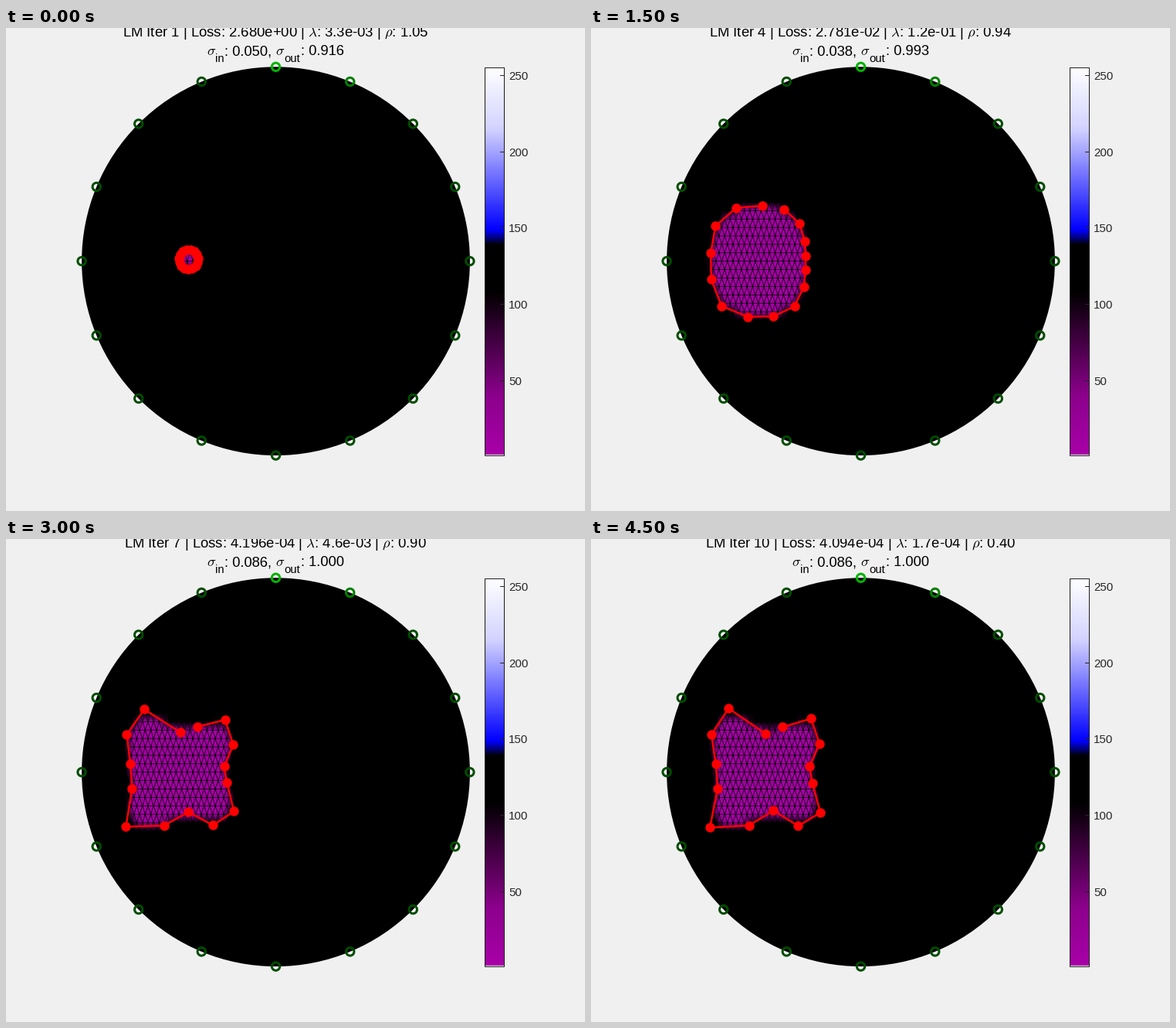
These frames come from a looping animation (750 px wide and 625 px high, 5000 ms). A matplotlib script:

```python
import numpy as np
import matplotlib.pyplot as plt
from matplotlib.animation import FuncAnimation
from matplotlib.collections import EllipseCollection
from matplotlib.colors import LinearSegmentedColormap
from matplotlib.path import Path
from matplotlib.tri import Triangulation

W, H, DPI = 750, 625, 100
PX = 72 / DPI                      # points per pixel
CX, CY, R = 349.5, 301.7, 251.4    # tank
SX, SY = 236.4, 299.3              # centre of the inclusion
DARK = "#262626"

plt.rcParams["font.family"] = "Liberation Sans"
plt.rcParams["mathtext.fontset"] = "cm"

# Control points slide along 15 fixed rays around the inclusion's centre
RAYS = np.radians(102 + 24 * np.arange(15))
UX, UY = np.cos(RAYS), -np.sin(RAYS)
PINCUSHION = np.array([48, 99, 93, 75, 76, 111, 78, 52, 79, 82, 53, 47, 69, 83, 57])

# Readouts per iteration; the sigmas stay at their last value
LOSS = [2.680, 2.478, 2.598e-1, 2.781e-2, 2.364e-3,
        5.285e-4, 4.196e-4, 4.113e-4, 4.098e-4, 4.094e-4]
RHO = [1.05, 1.50, 2.11, 0.94, 0.97, 0.96, 0.90, 0.81, 0.62, 0.40]
SIGMA_IN = [0.050, 0.034, 0.010, 0.038, 0.079, 0.087, 0.086]
SIGMA_OUT = [0.916, 0.921, 0.930, 0.993, 1.000]


def at(values, i):
    return values[min(i, len(values) - 1)]


def damping(i):
    return 3.3e-3 if i == 0 else 1.11 / 3 ** (i - 1)


def mix(a, b, t):
    return a + (b - a) * t


def superellipse(x, y, a, b, n):
    """Distance along each ray from the centre to a superellipse."""
    lo, hi = np.zeros(15), np.full(15, 150.0)
    for _ in range(30):
        r = (lo + hi) / 2
        within = (np.abs((SX + r * UX - x) / a) ** n
                  + np.abs((SY + r * UY - y) / b) ** n) < 1
        lo, hi = np.where(within, r, lo), np.where(within, hi, r)
    return lo


OVAL = superellipse(217.3, 300.8, 50, 70, 2.2)
ROUND = superellipse(216.5, 302, 61.5, 72, 2.9)


def radii(i):
    if i < 3:
        return mix(12.3, OVAL, (0, 0.2, 1)[i])
    return mix(ROUND, PINCUSHION, 1 - 0.45 ** (i - 3))


def control_points(i):
    r = radii(i)
    return np.column_stack([SX + r * UX, SY + r * UY])


def spline(p, steps=14):
    """Closed uniform cubic B-spline."""
    t = np.linspace(0, 1, steps, endpoint=False)[:, None, None]
    a, c, d = (np.roll(p, s, axis=0) for s in (1, -1, -2))
    q = ((1 - t) ** 3 * a + (3 * t**3 - 6 * t**2 + 4) * p
         + (-3 * t**3 + 3 * t**2 + 3 * t + 1) * c + t**3 * d) / 6
    return q.transpose(1, 0, 2).reshape(-1, 2)


def inside_weight(nodes, curve):
    gap = np.hypot(*(nodes[:, None] - curve[None]).transpose(2, 0, 1)).min(axis=1)
    sign = np.where(Path(curve).contains_points(nodes), 1, -1)
    return np.clip(0.5 + sign * gap / 6, 0, 1)


def mesh_nodes(side=7.27, rise=10.89):
    row, col = np.mgrid[-9:10, 0:25]
    x = 136.7 + side * (col + 0.5 * (row % 2 == 0))
    return np.column_stack([x.ravel(), (CY + rise * row).ravel()])


fig = plt.figure(figsize=(W / DPI, H / DPI), dpi=DPI, facecolor="#f0f0f0")
ax = fig.add_axes([0, 0, 1, 1])
ax.axis("off")

ax.add_patch(plt.Circle((CX, CY), R, fc="black", ec="none"))

nodes = mesh_nodes()
tri = Triangulation(nodes[:, 0], nodes[:, 1])
fill_map = LinearSegmentedColormap.from_list("fill", ["#000000", "#a600a6"])
fill = ax.tripcolor(tri, np.zeros(len(nodes)), shading="gouraud",
                    cmap=fill_map, vmin=0, vmax=1, zorder=2)
ax.triplot(tri, color="black", lw=0.8 * PX, zorder=3)

# Electrodes, clockwise from the top
turn = np.radians(22.5 * np.arange(16))
rings = np.column_stack([CX + R * np.sin(turn), CY - R * np.cos(turn)])
greens = [(0, 0.7, 0), (0, 0.5, 0)] + [(0, 0.3, 0)] * 14
ax.add_collection(EllipseCollection(
    [10.4] * 16, [10.4] * 16, [0] * 16, units="xy", offsets=rings,
    transOffset=ax.transData, facecolors="none", edgecolors=greens,
    linewidths=3 * PX, zorder=4))

# Colour bar
BX0, BX1, BY0, BY1 = 619.5, 644.5, 50.5, 552.5
stops = [(0, "#a800a8"), (0.15, "#8c008c"), (0.42, "#000000"), (0.54, "#000000"),
         (0.58, "#0000ff"), (0.84, "#d2d2ff"), (1, "#ffffff")]
bar_map = LinearSegmentedColormap.from_list("bar", stops)
ax.imshow(np.linspace(1, 0, 256)[:, None], cmap=bar_map, aspect="auto",
          extent=(BX0, BX1, BY1, BY0), interpolation="nearest", zorder=2)
ax.add_patch(plt.Rectangle((BX0, BY0), BX1 - BX0, BY1 - BY0, fc="none",
                           ec=DARK, lw=1.1 * PX, zorder=3))
for v in range(50, 251, 50):
    y = 555 - 1.977 * v
    ax.plot([BX1 - 5, BX1], [y, y], color=DARK, lw=PX, zorder=3)
    ax.text(651, y + 5.9, str(v), size=15 * PX, color=DARK, va="baseline")
ax.set_xlim(0, W)
ax.set_ylim(H, 0)


def label(x, y, s="", px=18.33, **kw):
    return ax.text(x, y, s, size=px * PX, color="black", va="baseline", **kw)


title = label(349.3, 11.3, px=18.45, ha="center")
for x, name in ((259.5, "in"), (349, "out")):
    label(x, 35.3, r"$\sigma$")
    label(x + 11.7, 44, name, 14.7)
inner = label(282.8, 35.3)
outer = label(382.2, 35.3)

outline, = ax.plot([], [], "-o", color="red", lw=2.5 * PX, ms=12.4 * PX,
                   mew=0, zorder=5)


def draw(i):
    p = control_points(i)
    outline.set_data(p[:, 0], p[:, 1])
    fill.set_array(inside_weight(nodes, spline(p)))
    title.set_text(rf"LM Iter {i + 1} | Loss: {LOSS[i]:.3e} | $\lambda$: "
                   rf"{damping(i):.1e} | $\rho$: {RHO[i]:.2f}")
    inner.set_text(f": {at(SIGMA_IN, i):.3f},")
    outer.set_text(f": {at(SIGMA_OUT, i):.3f}")
    return outline, fill, title, inner, outer


anim = FuncAnimation(fig, draw, frames=10, interval=500, repeat=True,
                     repeat_delay=0, blit=False)
plt.show()
```
